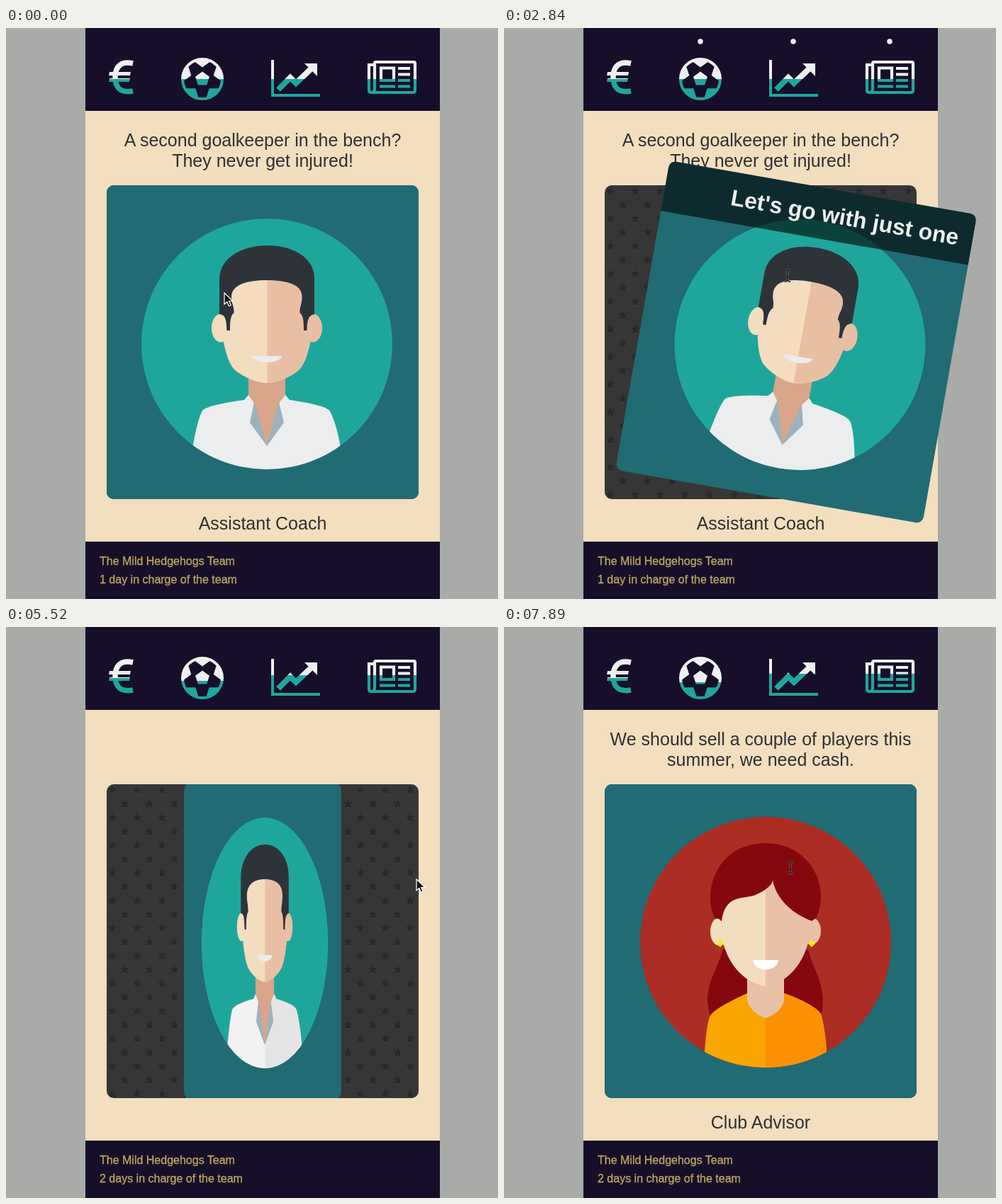
Write an HTML page that moves like this. It is 694 by 806 pixels and loops after 8 s.

```html
<!DOCTYPE html>
<html lang="en">
<head>
<meta charset="utf-8">
<style>
  html, body { margin: 0; width: 100%; height: 100%; overflow: hidden; background: #a9aba8; }
  svg { display: block; width: 694px; height: 806px; }
  text { font-family: "Liberation Sans", Arial, sans-serif; }
  .say { font-size: 25px; fill: #2f3033; text-anchor: middle; }
  .foot { font-size: 16px; fill: #bda65c; stroke: #bda65c; stroke-width: .35px; }
  .choice { font-size: 32px; font-weight: bold; fill: #eef0f0; }
</style>
</head>
<body>
<svg viewBox="0 0 694 806">
  <defs>
    <clipPath id="disc"><circle cx="368" cy="446" r="177"/></clipPath>
    <clipPath id="disc2"><circle cx="369" cy="445" r="177"/></clipPath>
    <clipPath id="right"><rect x="368.5" y="200" width="230" height="480"/></clipPath>
    <clipPath id="ball"><circle cx="277" cy="72" r="29"/></clipPath>
    <pattern id="stars" x="142" y="222" width="35" height="39" patternUnits="userSpaceOnUse">
      <g id="starTile"></g>
    </pattern>
    <g id="levels"></g>
  </defs>

  <rect x="112" width="500" height="806" fill="#f3debe"/>
  <rect x="112" width="500" height="117" fill="#170e2a"/>
  <rect x="112" y="725" width="500" height="81" fill="#170e2a"/>

  <g fill="#eef0f0" id="dots">
    <circle cx="277" cy="19"/><circle cx="408" cy="19"/><circle cx="544" cy="19"/>
  </g>

  <g fill="url(#lv0)">
    <path d="M179 50C161 46 154 56 154 69C154 85 162 92 179 89" fill="none" stroke="url(#lv0)" stroke-width="7.5"/>
    <path d="M146 62H176L175 67H145ZM146 71H175L174 76H145Z"/>
  </g>
  <g fill="url(#lv1)">
    <circle cx="277" cy="72" r="28" fill="none" stroke="url(#lv1)" stroke-width="4"/>
    <path id="patches" clip-path="url(#ball)"/>
  </g>
  <g fill="none" stroke="url(#lv2)">
    <path d="M376 45V95H443" stroke-width="4"/>
    <path d="M384 87L401 70L409 78L432 56" stroke-width="8"/>
    <path d="M421 50H439V68Z" fill="url(#lv2)" stroke="none"/>
  </g>
  <g fill="none" stroke="url(#lv3)" stroke-width="4.2">
    <path d="M520 50Q520 48 522 48H575Q577 48 577 50V88Q577 91 574 91H515Q512 91 512 88V52H520V86Q520 91 515 91"/>
    <path d="M529 56.5H547V74H529ZM553 57H570M553 65.5H570M553 74H570M553 82.5H570M527 82.5H549"/>
  </g>

  <g id="caption">
    <text class="say" x="362" y="167" id="line1"></text>
    <text class="say" x="362" y="196" id="line2"></text>
    <text class="say" x="362" y="708" id="who"></text>
  </g>
  <text class="foot" x="132" y="758">The Mild Hedgehogs Team</text>
  <text class="foot" x="132" y="784" id="days"></text>

  <rect x="142" y="222" width="440" height="443" rx="10" fill="#363636"/>
  <rect x="142" y="222" width="440" height="443" rx="10" fill="url(#stars)"/>

  <g id="card">
    <rect x="142" y="222" width="440" height="443" rx="10" fill="#216b74"/>

    <g id="man">
      <circle cx="368" cy="446" r="177" fill="#1fa69c"/>
      <g clip-path="url(#disc)">
        <path id="shirt" d="M262 630V600C268 565 272 550 277 540C283 533 320 527 336 525L342 518H394L400 525C420 528 452 533 457 541C463 552 468 570 472 592V630Z"/>
        <use href="#shirt" id="shirtRight" clip-path="url(#right)"/>
        <path d="M350 528L344 557L368 590L392 557L385 528Z" fill="#9cb1bd"/>
        <path d="M342 485H394V518L384 531L368 589L351 531L342 518Z" fill="#d8a588"/>
      </g>
      <ellipse cx="303" cy="423.500" rx="13" ry="20" fill="#f3ddbe"/>
      <ellipse cx="433" cy="423.500" rx="13" ry="20" fill="#e9bfa4"/>
      <path id="face" d="M368 350H312V404L305 430C308 455 314 473 322 482C336 494 355 501 368 501C381 501 400 494 414 482C422 473 428 455 431 430L424 404V350Z" fill="#f3ddbe"/>
      <g clip-path="url(#right)"><path d="M368 350V501C381 501 400 494 414 482C422 473 428 455 431 430L424 404V350Z" fill="#e9bfa4"/></g>
      <path d="M301 404V355C301 325 332 307 369 307C406 307 435 325 435 353V404C428 406 425 408 424.500 427H420C420 412 419 406 414.500 402C414 392 418 390 417.500 378C417 362 396 356 368 356C340 356 318 362 318 380C318 390 322 392 321.500 402C317 406 316 412 316 427H311.500C311 410 309 405 301 404Z" fill="#2e333a"/>
      <path d="M346 463H390C384 475 352 475 346 463Z" fill="#ebecee"/>
    </g>

    <g id="woman">
      <circle cx="369" cy="445" r="177" id="red"/>
      <g clip-path="url(#right)"><circle cx="369" cy="445" r="177" fill="#ac2d23"/></g>
      <g clip-path="url(#disc2)">
        <path d="M309 455C300 485 287 500 287 528Q288 540 291 549H447C450 540 451 525 448 510C444 490 433 475 429 455Z" fill="#85080f"/>
        <path id="top" d="M283 630V600C285 570 288 552 292 547C300 537 330 523 343 517H395C410 522 440 535 447 546C451 560 454 580 455 600V630Z" fill="#f9a602"/>
        <g clip-path="url(#right)"><path d="M368 630V517H395C410 522 440 535 447 546C451 560 454 580 455 600V630Z" fill="#fc9003"/></g>
      </g>
      <path d="M343 485V527C347 542 360 549 369 552C378 549 392 542 395 527V485Z" fill="#e9c1a7"/>
      <ellipse cx="304" cy="430" rx="13" ry="20" fill="#f3ddbf"/>
      <ellipse cx="434" cy="429" rx="13" ry="19" fill="#e9c1a7"/>
      <path d="M369 345H307V435C312 470 335 502 369 507Z" fill="#f3ddbf"/>
      <path d="M369 345H431V435C426 470 403 502 369 507Z" fill="#e9c1a7"/>
      <path d="M298 412C291 398 291 388 291 380C293 335 325 305 369 305C415 305 447 340 447 380C447 393 444 403 440 411L434 415C408 405 384 385 379 357C379 362 372 371 355 378C340 385 312 375 307 416Q303 410 298 412Z" fill="#85080f"/>
      <path d="M300 447L305 442L310 447L305 452ZM429 447L434 442L439 447L434 452Z" fill="#fdec05"/>
      <path d="M351 470H387C386 488 352 488 351 470Z" fill="#fff"/>
    </g>

    <g id="choice">
      <path d="M142 294V232Q142 222 152 222H572Q582 222 582 232V294Z" fill="#000" fill-opacity=".6"/>
      <text class="choice" y="269" id="choiceText"></text>
    </g>
  </g>

  <path id="arrow" d="M0 0V16L3.800 12.500L6.500 18.500L9.200 17.300L6.600 11.500H11.800Z" fill="#111" stroke="#fff" stroke-width="1.200"/>
  <g id="beam" fill="none">
    <path id="beamShape" d="M-4 -8Q0 -8 0 -5Q0 -8 4 -8M0 -6V6M-4 8Q0 8 0 5Q0 8 4 8M-2 2H2" stroke="#999" stroke-opacity=".5" stroke-width="3"/>
    <path d="M-4 -8Q0 -8 0 -5Q0 -8 4 -8M0 -6V6M-4 8Q0 8 0 5Q0 8 4 8M-2 2H2" stroke="#191919" stroke-width="1.300"/>
  </g>
</svg>

<script>
const $ = id => document.getElementById(id);
const set = (id, attrs) => { for (const k in attrs) $(id).setAttribute(k, attrs[k]); };
const show = (id, on) => set(id, { visibility: on ? 'visible' : 'hidden' });
const write = (id, s) => { if ($(id).textContent !== s) $(id).textContent = s; };

const LOOP = 8000, TICK = 149;

// Regular shape around a centre; radii alternate between its points
function ring(cx, cy, radii, n, turn = -Math.PI / 2) {
  const pts = Array.from({ length: n }, (_, i) => {
    const a = turn + i * 2 * Math.PI / n, r = radii[i % radii.length];
    return (cx + r * Math.cos(a)).toFixed(2) + ' ' + (cy + r * Math.sin(a)).toFixed(2);
  });
  return 'M' + pts.join('L') + 'Z';
}

let patches = ring(277, 72, [10.5], 5);
for (let i = 0; i < 5; i++) {
  const a = -Math.PI / 2 + i * 2 * Math.PI / 5;
  patches += ring(277 + 27 * Math.cos(a), 72 + 27 * Math.sin(a), [10.5], 5, a + Math.PI);
}
set('patches', { d: patches });

const star = (x, y) => ring(x, y, [7, 3.4], 10);
const tile = star(8, 8.5) + star(25.5, 28);
$('starTile').innerHTML =
  `<path d="${tile}" fill="#414141" transform="translate(0 1)"/><path d="${tile}" fill="#2a2a2a"/>`;

$('levels').innerHTML = [0, 1, 2, 3].map(i =>
  `<linearGradient id="lv${i}" gradientUnits="userSpaceOnUse" x1="0" y1="0" x2="0" y2="100">
   <stop stop-color="#eef0f0"/><stop stop-color="#1fa69c"/></linearGradient>`).join('');
const endLevels = [72, 78, 66, 66];

// Linear interpolation through rows of [tick, value, ...]
function track(rows, t, col = 1) {
  let i = 1;
  while (i < rows.length - 1 && t > rows[i][0]) i++;
  const a = rows[i - 1], b = rows[i];
  const u = Math.min(1, Math.max(0, (t - a[0]) / (b[0] - a[0])));
  return a[col] + (b[col] - a[col]) * u;
}

const drag = [[0, 0], [1, -5], [4, -40], [6, -50], [9, -50], [12, 0], [15, 0], [16, 7.5],
  [18, 38], [19, 50], [23, 50], [26, 0], [31, 0], [32, 15], [34, 0]];
const mouse = [[0, 308, 374], [6, 240, 373], [9, 240, 373], [12, 325, 364], [15, 325, 364],
  [16, 335, 362], [19, 400, 350], [23, 400, 346], [26, 374, 338], [31, 374, 338],
  [32, 395, 342], [35, 579, 356], [49, 579, 356], [53, 404, 340]];
const level = [[32, 0], [34, .3], [37, .7], [39, 1]];

function flip(t) {
  if (t < 35.1) return 1;
  if (t < 41.6) return (1 - (t - 35.1) / 6.55) ** 2;
  return Math.min(1, (t - 41.6) / 4.4) ** 2;
}

function draw() {
  const t = Math.floor((performance.now() % LOOP + 8) / TICK);
  const d = track(drag, t), dragging = Math.abs(d) > .1;
  const second = t > 41, decided = t > 32;

  set('card', { transform: `translate(${362 + d} 443.5) rotate(${d / 5}) scale(${flip(t)} 1) translate(-362 -443.5)` });
  show('man', !second);
  show('woman', second);
  const turning = flip(t) < 1;
  set('shirt', { fill: turning ? '#f2f2f3' : '#ecedee' });
  $('shirtRight').style.display = turning ? '' : 'none';
  set('red', { fill: turning ? '#bf352c' : '#ac2d23' });
  if (turning) $('man').querySelector('#shirtRight').style.filter = 'brightness(.948)';

  show('choice', dragging);
  set('choiceText', { x: d < 0 ? 162 : 562, 'text-anchor': d < 0 ? 'start' : 'end' });
  write('choiceText', d < 0 ? 'We need the sub' : "Let's go with just one");
  for (const dot of $('dots').children) dot.setAttribute('r', dragging ? .5 + .065 * Math.abs(d) : 0);

  set('caption', { opacity: decided ? track([[45, 0], [47, 1]], t) : 1 });
  write('line1', decided ? 'We should sell a couple of players this' : 'A second goalkeeper in the bench?');
  write('line2', decided ? 'summer, we need cash.' : 'They never get injured!');
  write('who', decided ? 'Club Advisor' : 'Assistant Coach');
  write('days', (decided ? '2 days' : '1 day') + ' in charge of the team');

  endLevels.forEach((end, i) => {
    const y = 72 + (end - 72) * track(level, t);
    for (const stop of $('lv' + i).children) stop.setAttribute('offset', y + '%');
  });

  const beam = dragging || t >= 53;
  show('beam', beam);
  show('arrow', !beam);
  set(beam ? 'beam' : 'arrow', { transform: `translate(${track(mouse, t)} ${track(mouse, t, 2)})` });
  requestAnimationFrame(draw);
}
draw();
</script>
</body>
</html>
```
